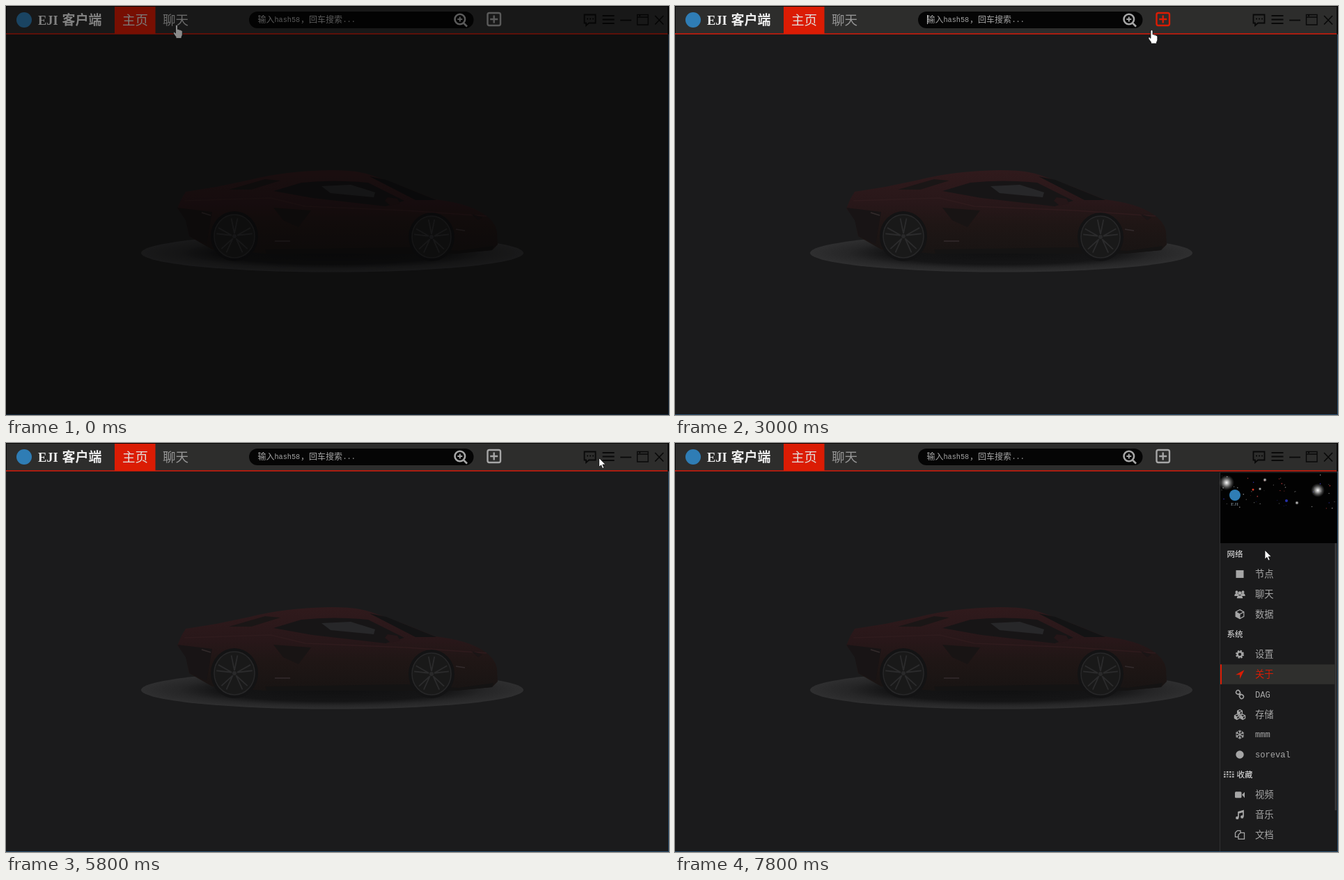
An HTML page that plays this animation: 952 by 588 pixels, repeating every 8000 ms.

```html
<!DOCTYPE html>
<html lang="zh">
<head>
<meta charset="utf-8">
<title>客户端</title>
<style>
html, body { margin: 0; width: 100%; height: 100%; overflow: hidden; background: #1b1b1c; }
svg { display: block; width: 952px; height: 588px; }
text { font-family: "Noto Sans CJK SC", "Noto Sans CJK", sans-serif; font-weight: 300; white-space: pre; }
.mono { font-family: "Liberation Mono", monospace; font-weight: 400; }
.serif { font-family: "Liberation Serif", "Noto Serif", serif; font-weight: 700; }
.bold { font-weight: 700; }
.line { fill: none; stroke: currentColor; }
.solid { fill: currentColor; }
</style>
</head>
<body>
<svg viewBox="0 0 952 588" xmlns="http://www.w3.org/2000/svg">
  <defs>
    <radialGradient id="floor">
      <stop offset="0" stop-color="#101011"/>
      <stop offset=".6" stop-color="#151516"/>
      <stop offset=".8" stop-color="#262627"/>
      <stop offset="1" stop-color="#2f2f30"/>
    </radialGradient>
    <linearGradient id="paint" x2="0" y2="1">
      <stop offset="0" stop-color="#301a1c"/>
      <stop offset=".4" stop-color="#281719"/>
      <stop offset=".65" stop-color="#1f1615"/>
      <stop offset="1" stop-color="#181413"/>
    </linearGradient>
    <radialGradient id="glow">
      <stop offset="0" stop-color="#fff"/>
      <stop offset=".3" stop-color="#ccc" stop-opacity=".8"/>
      <stop offset="1" stop-color="#777" stop-opacity="0"/>
    </radialGradient>
  </defs>
  <rect width="952" height="588" fill="#1b1b1c"/>
  <g id="car"></g>
  <g id="side"></g>
  <g id="bar"></g>
  <path d="M951.500 41V587.500H0" fill="none" stroke="#2c5070"/>
  <path id="pointer" fill="#fff" stroke="#111" stroke-width=".8"/>
  <rect id="shade" width="952" height="588" fill="#000" opacity=".46"/>
</svg>
<script>
const RED = '#db1c04', GREY = '#a6a6a6', INK = '#090909', BLUE = '#2f7db5';
const STEP = 200, LOOP = 8000;
const $ = id => document.getElementById(id);

const label = (s, x, y, size, fill, cls = '', id = '') =>
  `<text id="${id}" x="${x}" y="${y + size * .37}" font-size="${size}" fill="${fill}" class="${cls}">${s}</text>`;
const rect = (x, y, w, h, fill, extra = '') =>
  `<rect x="${x}" y="${y}" width="${w}" height="${h}" fill="${fill}" ${extra}/>`;
const line = (d, w, extra = '') => `<path class="line" d="${d}" stroke-width="${w}" ${extra}/>`;
const solid = d => `<path class="solid" d="${d}"/>`;
const disc = (x, y, r, fill = 'currentColor') => `<circle cx="${x}" cy="${y}" r="${r}" fill="${fill}"/>`;

function wheel(x, y, r) {
  let spokes = '';
  for (let i = 0; i < 5; i++) {
    const a = i * Math.PI * .4 - Math.PI / 2;
    for (const d of [-.17, .17]) {
      spokes += `M${x + 4 * Math.cos(a)} ${y + 4 * Math.sin(a)}` +
        `L${x + r * .84 * Math.cos(a + d)} ${y + r * .84 * Math.sin(a + d)}`;
    }
  }
  return `<ellipse cx="${x}" cy="${y}" rx="${r + 3}" ry="${r + 5}" fill="#131314"/>
    <ellipse cx="${x}" cy="${y}" rx="${r - 2}" ry="${r}" fill="#191919" stroke="#272728" stroke-width="1.6"/>
    <path d="${spokes}" stroke="#2b2b2c" stroke-width="1.8"/>${disc(x, y, 3, '#29292a')}`;
}

function car() {
  return `<ellipse cx="468.500" cy="355" rx="274.500" ry="27.500" fill="url(#floor)"/>
    <path d="M252 277L258 267L302 260L350 250Q400 237 466 236Q505 236 524 243L566 258L616 278
      Q662 283 686 299Q702 309 705 324L706 343L698 351L646 356H372L296 350L263 331L258 306L246 291Z" fill="url(#paint)"/>
    <path d="M320 264L372 249L394 251L352 264Z" fill="#1a1616"/>
    <path d="M384 266L424 254Q470 249 520 254L572 280L545 288L440 276Z" fill="#171516"/>
    <path d="M522 245L546 250L618 279L588 279Z" fill="#131314"/>
    <path d="M453 259L495 257L530 268L528 275L466 269Z" fill="#272729"/>
    <path d="M544 280L548 275L562 277L566 284L552 287Z" fill="#251618"/>
    <path d="M384 290L438 294L420 318L398 308Z" fill="#181414"/>
    <path d="M246 290L296 296L288 342L264 331L258 308Z" fill="#181415"/>
    <path d="M256 280L380 276L430 288L575 294L690 302" fill="none" stroke="#2f1b1d" stroke-width="1.500"/>
    <path d="M372 350L576 347L650 352L700 345L698 351L646 356H374Z" fill="#141313"/>
    <path d="M281 297L294 301M646 321L659 323M386 338H408" stroke="#332b2c" stroke-width="1.500"/>
    <path d="M668 299L684 304L678 308Z" fill="#1b1516"/>
    ${wheel(328, 331, 31)}${wheel(611, 332, 30)}`;
}

function bar() {
  return rect(0, 0, 952, 40, '#070707') + rect(1, 1, 949, 38, '#2d2d2c') +
    rect(0, 39, 950, 2, '#aa1d10') + disc(26, 20, 11, BLUE) +
    label('EJI', 46, 20.5, 18.5, '#eee', 'serif') + label('客户端', 80.5, 20, 19, '#eee', 'bold') +
    `<rect id="tab" y="1" width="58.500" height="39" fill="${RED}"/>` +
    label('主页', 167, 20, 18.5, GREY, '', 'home') + label('聊天', 225, 20, 18.5, GREY, '', 'chat') +
    rect(349, 8, 322.5, 24, '#050505', 'rx="12"') +
    label('输入', 361.5, 19.5, 12, GREY) + label('hash58', 385.5, 19.5, 10.2, GREY, 'mono') +
    label('，回车搜索', 423, 19.5, 12, GREY) + label('...', 483.5, 19.5, 10.2, GREY, 'mono') +
    `<path id="caret" d="M362.500 13V26" stroke="#ccc"/>
    <g color="${GREY}">${line('M644.500 19a7.300 7.300 0 1 0 14.600 0a7.300 7.300 0 1 0-14.600 0M657 24.500L662 29.500', 2.6)}
      ${line('M651.800 15.500V22.500M648.300 19H655.300', 2)}</g>
    <g id="add">${line('M694 10H707.500Q710 10 710 12.500V25.500Q710 28 707.500 28H694Q691.500 28 691.500 25.500V12.500Q691.500 10 694 10Z', 2.4)}
      ${line('M700.700 13.500V24.500M695.200 19H706.200', 2.4)}</g>
    <g id="msg">${line('M831.500 12.500H846.500V24.500H837L833 28V24.500H830.500V12.500Z', 1.8)}
      ${[835, 839, 843].map(x => disc(x, 18.5, 1.1)).join('')}</g>
    <g id="menu">${line('M856.500 14H873.500M856.500 19.500H873.500M856.500 25H873.500', 2)}</g>
    <g color="${INK}">${line('M882 20.500H898', 1.8)}${line('M906.500 12.500H922V27H906.500ZM906.500 16H922M909 14H911', 1.4)}
      ${line('M932 14L944 26.500M944 14L932 26.500', 1.7)}</g>`;
}

const cube = (x, y, r) => {
  const w = r * .9, h = r * .5;
  return line(`M${x} ${y - r}L${x + w} ${y - h}V${y + h}L${x} ${y + r}L${x - w} ${y + h}V${y - h}Z` +
    `M${x - w} ${y - h}L${x} ${y}L${x + w} ${y - h}M${x} ${y}V${y + r}`, 1.2) +
    solid(`M${x - w} ${y - h}L${x} ${y}V${y + r}L${x - w} ${y + h}Z`);
};
const person = (x, y, s) => disc(x, y, 2.4 * s) + solid(`M${x - 4 * s} ${y + 7 * s}q0-4 ${4 * s}-4t${4 * s} 4Z`);

// Icons are drawn around their own centre.
const icons = {
  node: rect(-5.5, -5.5, 11, 11, 'currentColor'),
  people: person(-4.5, -3, .8) + person(4.5, -3, .8) + person(0, -1.5, 1.05),
  cube: cube(0, 0, 6.5),
  gear: `<circle class="line" r="4.700" stroke-width="2.600" stroke-dasharray="2.200 1.490"/><circle class="line" r="3.400" stroke-width="2.400"/>`,
  arrow: solid('M6.500-6.500L-6 .500H0V6.500Z'),
  chain: line('M-5-4.500a2.500 2.500 0 0 1 4-1l1 1.500a2.500 2.500 0 0 1-3.500 3.500l-1.500-1a2.500 2.500 0 0 1 0-3M5 4.500a2.500 2.500 0 0 1-4 1l-1-1.500a2.500 2.500 0 0 1 3.500-3.500l1.500 1a2.500 2.500 0 0 1 0 3M-1.500-1.500L1.500 1.500', 1.6),
  cubes: cube(0, -3.2, 3.8) + cube(-4.2, 3.4, 3.8) + cube(4.2, 3.4, 3.8),
  flake: [0, 60, 120].map(a => line('M0-6.500V6.500M-2-5.500L0-3.500L2-5.500M-2 5.500L0 3.500L2 5.500', 1.2, `transform="rotate(${a})"`)).join(''),
  disc: disc(0, 0, 5.7),
  video: rect(-7, -4.5, 9.5, 9, 'currentColor', 'rx="1.5"') + solid('M3 0L7-4V4.500Z'),
  music: line('M-2 4V-4L5-6V2.500M-2-2.500L5-4.500', 1.7) + disc(-3.7, 4.4, 2.2) + disc(3.3, 3, 2.2),
  files: line('M-2 3H-6.500V-3L-3.500-6H1V-3M-2 6V0L1-3H6.500V6Z', 1.3)
};

// Rows without an icon are headings.
const rows = [
  ['网络'], ['节点', 'node'], ['聊天', 'people'], ['数据', 'cube'],
  ['系统'], ['设置', 'gear'], ['关于', 'arrow'], ['DAG', 'chain'], ['存储', 'cubes'],
  ['mmm', 'flake'], ['soreval', 'disc'],
  ['收藏'], ['视频', 'video'], ['音乐', 'music'], ['文档', 'files']
];

function stars() {
  let seed = 11, out = '';
  const rnd = () => (seed = seed * 16807 % 2147483647) / 2147483647;
  const tints = ['#777', '#555', '#933', '#33a', '#999'];
  for (let i = 0; i < 48; i++) {
    out += disc(785 + rnd() * 162, 46 + rnd() * 48, .4 + rnd() * .5, tints[i % 5]);
  }
  for (const [x, y, r] of [[792, 57, 11], [923, 68, 10], [847, 53, 3], [893, 86, 3], [840, 66, 2.5]]) {
    out += disc(x, y, r, 'url(#glow)');
  }
  return out + disc(830, 67, 1.5, '#d43a24') + disc(878, 83, 2, '#2631a8');
}

function side() {
  let out = rect(782, 42, 169, 546, '#1b1b1c') + rect(782, 42, 1, 546, '#303031') +
    rect(783, 43, 168, 101, '#020202') + stars() + disc(804, 75, 8, BLUE) +
    label('EJI', 798, 87, 7, '#66717a', 'serif') +
    rect(947.5, 144, 2.5, 384, '#39393a');
  rows.forEach(([name, icon], i) => {
    const y = 159.3 + i * 28.84;
    if (!icon) {
      const x = i === 11 ? 806.5 : 792.5;
      out += label(name, x, y, 11.5, '#eee');
      return;
    }
    const latin = /^[a-z]/i.test(name);
    const hot = name === '关于' ? 'id="about"' : '';
    out += `<g ${hot} color="${GREY}">` + (hot ? `<g id="lit">${rect(783, y - 14, 164.5, 28.5, '#2f2f2d')}${rect(783, y - 14, 2, 28.5, RED)}</g>` : '') +
      `<g transform="translate(811 ${y + .3})">${icons[icon]}</g>` +
      label(name, 833, y, latin ? 12.1 : 13.3, 'currentColor', latin ? 'mono' : '') + '</g>';
  });
  for (let i = 0; i < 12; i++) {
    out += rect(788 + i % 4 * 4, 472 + (i >> 2) * 3.4, 2.6, 2, i % 3 ? '#bbb' : '#777');
  }
  return out;
}

const shapes = {
  hand: 'M-1.500 1.500Q-1.500 0 0 0T1.500 1.500V6.500Q3.200 6 4 7.300Q5.500 6.700 6.300 8Q8.300 7.700 8.300 9.500V14Q8 16 7 17.500V19.500H-1V17.500L-4.600 12.500Q-5 10.200-3.300 10.300L-1.500 12Z',
  arrow: 'M0 0V13L3 10.300L5 15L7.200 14L5.200 9.500H9.300Z',
  beam: 'M-3-7H3V-6H.500V7H3V8H-3V7H-.500V-6H-3Z'
};

// Pointer path: step, x, y
const path = [
  [0, 245, 27], [1, 245, 27], [4, 243, 21], [5, 243, 21], [6, 234, 20], [8, 189, 18], [10, 189, 19],
  [12, 385, 19], [13, 402, 20], [15, 684.5, 34.5], [16, 697, 22], [17, 699, 20], [18, 712, 27],
  [21, 853.5, 37.5], [23, 853.5, 37.5], [24, 851, 43], [26, 839, 24], [28, 840, 22],
  [30, 863, 21], [32, 866, 20], [35, 866.5, 24], [36, 866, 24], [37, 858, 170], [38, 846, 328], [39, 847, 154]
];

function locate(k) {
  const i = path.findIndex(p => p[0] >= k);
  const b = path[i], a = path[Math.max(0, i - 1)];
  const f = b[0] === a[0] ? 1 : (k - a[0]) / (b[0] - a[0]);
  return [1, 2].map(n => a[n] + (b[n] - a[n]) * f);
}

$('car').innerHTML = car();
$('bar').innerHTML = bar();
$('side').innerHTML = side();

function show(k) {
  const [x, y] = locate(k);
  const over = (left, right, bottom = 32) => x >= left && x <= right && y < bottom;
  const onHome = over(156, 214, 40), onChat = over(215, 272, 40);
  const onAdd = over(682, 711, 36), onMsg = over(829, 849), onMenu = over(855, 875);
  const chatting = k >= 4 && k < 10;
  const about = k >= 38;

  $('tab').setAttribute('x', chatting ? 214.5 : 156);
  $('home').setAttribute('fill', !chatting || onHome ? '#e2e0de' : GREY);
  $('chat').setAttribute('fill', chatting ? '#e2e0de' : onChat ? '#c4c4c4' : '#979797');
  $('add').setAttribute('color', onAdd ? RED : GREY);
  $('msg').setAttribute('color', onMsg ? RED : INK);
  $('menu').setAttribute('color', onMenu ? RED : INK);
  $('caret').style.display = k >= 13 && k * STEP % 1000 < 500 ? '' : 'none';

  $('side').style.display = k >= 37 ? '' : 'none';
  $('side').setAttribute('transform', `translate(${k === 37 ? 60 : 0} 0)`);
  $('lit').style.display = about ? '' : 'none';
  $('about').setAttribute('color', about ? RED : GREY);

  const hand = onHome || onChat || onAdd || onMsg || onMenu || k === 38;
  const kind = hand ? 'hand' : over(349, 671) ? 'beam' : 'arrow';
  $('pointer').setAttribute('d', shapes[kind]);
  $('pointer').setAttribute('transform', `translate(${x} ${y})`);
  $('shade').style.display = k === 0 ? '' : 'none';
}

let last = -1;
function tick(now) {
  const k = Math.floor(now % LOOP / STEP);
  if (k !== last) show(last = k);
  requestAnimationFrame(tick);
}
show(0);
requestAnimationFrame(tick);
</script>
</body>
</html>
```
